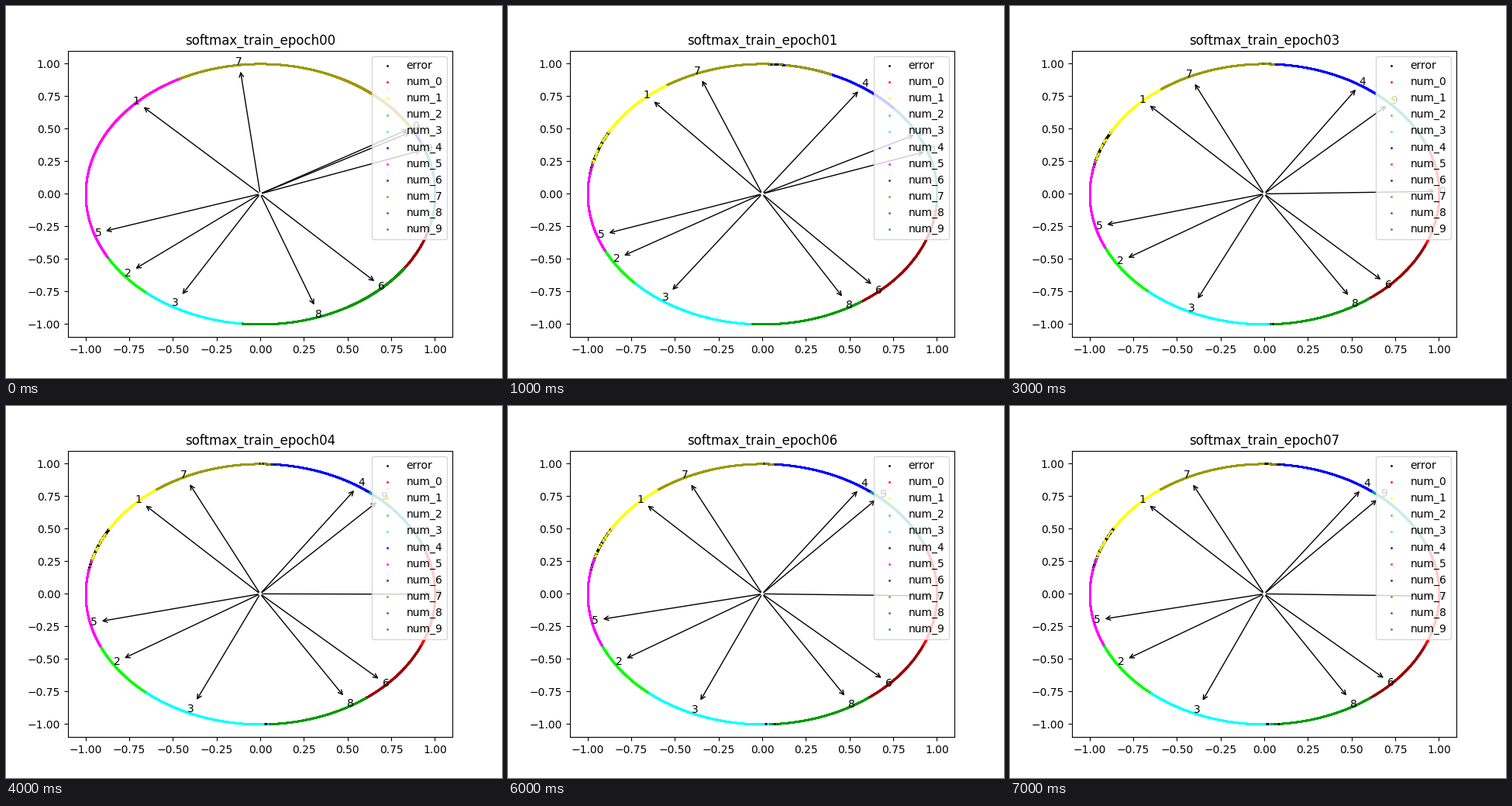
A matplotlib script that plays this animation: 640x480 px, repeating every 8 s.

```python
import numpy as np
import matplotlib.pyplot as plt
from matplotlib.animation import FuncAnimation

EPOCHS = 8
COLORS = ["#ff0000", "#ffff00", "#00ff00", "#00ffff", "#0000ff",
          "#ff00ff", "#990000", "#999900", "#009900", "#009999"]

# Weight direction of each class in degrees: first three epochs, then its limit.
KEYS = np.array([
    [29.7, 18.2, 2.9, -2.5],
    [136.8, 132.9, 135.7, 135.8],
    [219.2, 211.5, 212.3, 213.1],
    [239.7, 235.0, 241.5, 246.3],
    [28.2, 55.2, 59.2, 55.4],
    [198.8, 199.8, 199.6, 192.9],
    [-47.5, -49.7, -48.1, -45.1],
    [98.1, 113.1, 115.8, 117.5],
    [-71.6, -61.5, -59.0, -60.6],
    [19.0, 26.8, 37.6, 48.3],
])
DECAY = 0.42
STEP = 0.1

# Early on, some classes still cover a neighbour: epoch -> class -> arc.
OVERRUN = {0: {5: (117, 168), 7: (30, 64), 8: (-60, -34.5)},
           1: {7: (67, 85), 9: (-6, 23)}}


def weight_angles(epoch):
    if epoch < 2:
        return KEYS[:, epoch]
    limit = KEYS[:, 3]
    return limit + (KEYS[:, 2] - limit) * DECAY ** (epoch - 2)


def class_arcs(angles):
    """Each class owns the arc between the bisectors to its neighbours."""
    order = np.argsort(angles)
    ring = angles[order]
    upper = (ring + np.append(ring[1:], ring[0] + 360)) / 2
    lower = np.append(upper[-1] - 360, upper[:-1])
    return {d: (lo, hi) for d, lo, hi in zip(order, lower, upper)}


def error_zones(epoch, arcs):
    """Confused stretches around three of the borders: centre, half width."""
    if epoch == 0:
        return []
    return [(arcs[7][0] + 1, 3), (arcs[5][0] - 5, 10),
            (arcs[8][0], 0.4 * epoch)]


def inside(deg, zone):
    centre, half = zone
    return np.abs((deg - centre + 180) % 360 - 180) < half


def dots(ax, degrees, color, label):
    a = np.radians(degrees)
    ax.scatter(np.cos(a), np.sin(a), s=1, c=color, label=label)


def draw(epoch):
    rng = np.random.default_rng(epoch + 7)
    ax.clear()
    angles = weight_angles(epoch)
    arcs = class_arcs(angles)
    zones = error_zones(epoch, arcs)

    errors = [np.arange(c - h, c + h, STEP) for c, h in zones]
    dots(ax, np.concatenate(errors + [[angles[4]]]), "black", "error")
    for digit, color in enumerate(COLORS):
        deg = np.arange(*arcs[digit], STEP)
        extra = OVERRUN.get(epoch, {}).get(digit, (0, 0))
        deg = np.append(deg, np.arange(*extra, STEP))
        share = np.ones(deg.size)
        for zone in zones:
            share[inside(deg, zone)] = 0.2
        dots(ax, deg[rng.random(deg.size) < share], color, f"num_{digit}")

    for digit, a in enumerate(np.radians(angles)):
        ax.annotate(str(digit), xy=(0, 0), xytext=(np.cos(a), np.sin(a)),
                    arrowprops=dict(arrowstyle="<-"))

    ax.set_xlim(-1.1, 1.1)
    ax.set_ylim(-1.1, 1.1)
    ax.set_title(f"softmax_train_epoch{epoch:02d}")
    ax.legend(loc="upper right")
    return []


fig, ax = plt.subplots(figsize=(6.4, 4.8), dpi=100)
anim = FuncAnimation(fig, draw, frames=EPOCHS, interval=1000,
                     init_func=lambda: [], repeat=True, repeat_delay=0)
plt.show()
```
